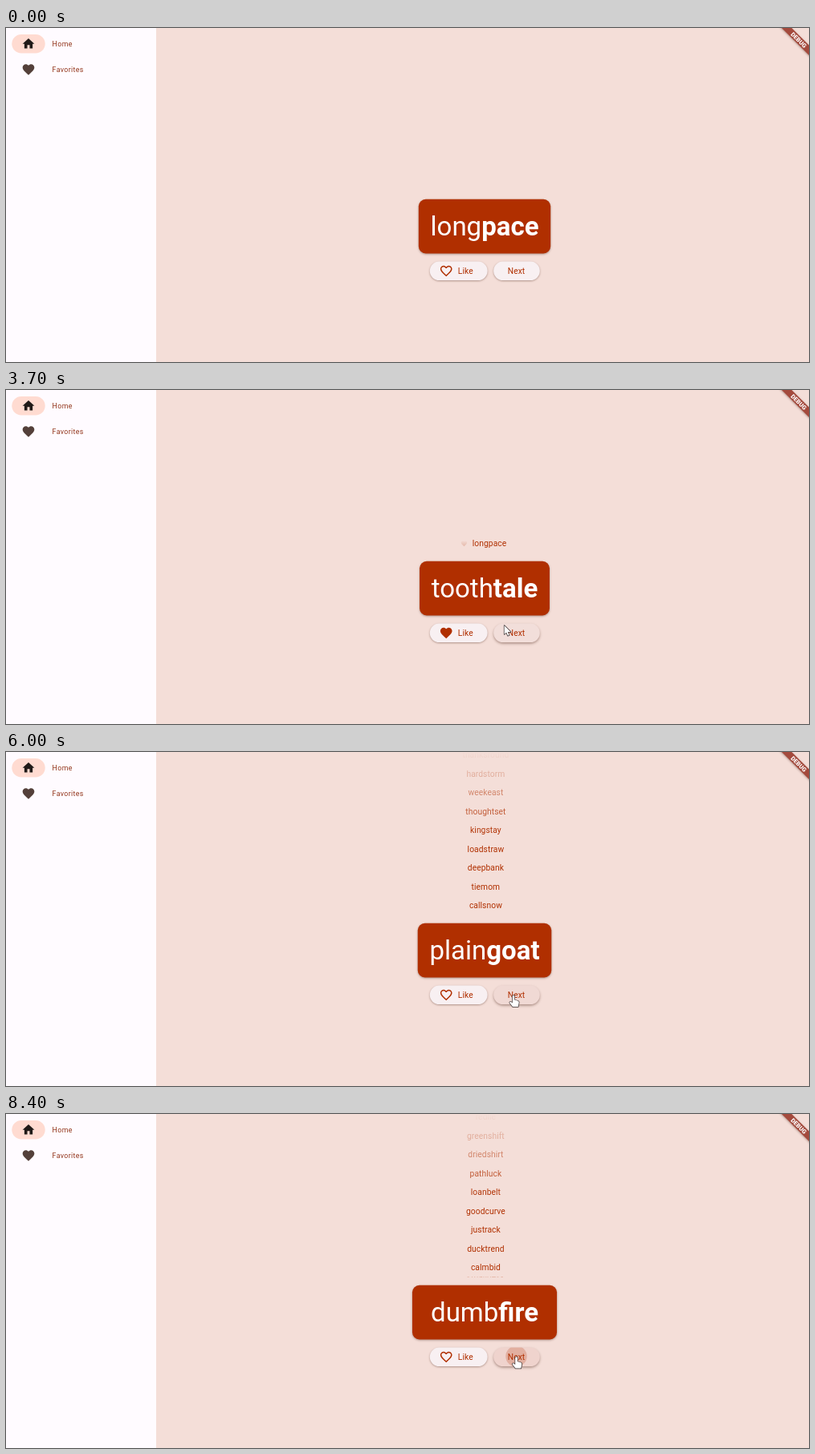
An HTML page with a canvas that plays this animation: 1000 px wide and 417 px high, repeating every 8.5 s.

```html
<!DOCTYPE html>
<html lang="en">
<head>
<meta charset="utf-8">
<title>Word pairs</title>
<style>
  html, body { margin: 0; width: 100%; height: 100%; overflow: hidden; background: #f4ded8; }
  canvas { display: block; }
</style>
</head>
<body>
<canvas id="stage" width="1000" height="417"></canvas>
<script>
const ctx = document.getElementById('stage').getContext('2d');
const LOOP = 8500, RED = '#b02f00', INK = '#201a18';
const ROW = 23.5, LIST_END = 203.5, INSERT_MS = 150, RESIZE_MS = 100;
const CARD_X = 596, SMALL = '10.28px Roboto, sans-serif';

const pairs = ('long-pace tooth-tale truth-grass near-team grand-beard thanks-round hard-storm ' +
  'week-east thought-set king-stay load-straw deep-bank tie-mom calls-now plain-goat ' +
  'loan-slope front-aid gray-charm mad-air gas-tour storm-fluid red-lie green-shift ' +
  'dried-shirt path-luck loan-belt good-curve just-rack duck-trend calm-bid small-desk ' +
  'dumb-fire').split(' ').map(p => p.split('-'));

// When each pair appears: [start, count, interval]
const shownAt = [[-1000, 1, 0], [2050, 1, 0], [4100, 6, 157], [5104, 2, 95], [5320, 5, 130],
  [6200, 7, 173.8], [7355, 8, 112], [8250, 2, 149]]
  .flatMap(([start, n, gap]) => Array.from({ length: n }, (_, i) => start + i * gap));
const likes = [[0, 1250], [1, 2950]]; // pair index, time of the like

// Pointer: time, x, y
const pointerKeys = [[400, 690, 425], [1000, 560, 305], [1350, 560, 305], [1600, 634, 306],
  [2200, 634, 306], [2600, 562, 305], [3250, 562, 305], [3700, 620.5, 294], [3900, 632, 304],
  [6200, 632, 304], [7200, 635.5, 303.5], [8500, 635.5, 303.5]];

const heart = new Path2D('M12 21.35l-1.45-1.32C5.4 15.36 2 12.28 2 8.5 2 5.42 4.42 3 7.5 3c1.74 0 3.41.81 4.5 2.09C13.09 3.81 14.76 3 16.5 3 19.58 3 22 5.42 22 8.5c0 3.78-3.4 6.86-8.55 11.54z');
const heartLine = new Path2D(heart);
heartLine.addPath(new Path2D('M12 18.65C7.14 14.24 4 11.39 4 8.5 4 6.5 5.5 5 7.5 5c1.54 0 3.04 1 3.57 2.36h1.87C13.46 6 14.96 5 16.5 5c2 0 3.5 1.5 3.5 3.5 0 2.89-3.14 5.74-8 10.15z'));
const house = new Path2D('M10 20v-6h4v6h5v-8h3L12 3 2 12h3v8z');
const arrow = new Path2D('M0 0V11L2.6 8.6 4.4 12.8 6.2 12 4.4 8H8Z');
const hand = new Path2D('M-1.3 1C-1.3-.6 1.3-.6 1.3 1V5.6L5 6.6C6.5 7 7 8 6.7 9.3L5.8 14H-1L-4.6 9.4C-5.2 8.3-4 7.4-3 8.1L-1.3 9.4Z');

const clamp = v => Math.max(0, Math.min(1, v));
const lerp = (a, b, k) => a + (b - a) * k;

const fade = ctx.createLinearGradient(0, 0, 0, LIST_END / 2);
fade.addColorStop(0, 'rgba(176,47,0,0)');
fade.addColorStop(1, RED);

function at(x, y, draw) {
  ctx.save();
  ctx.translate(x, y);
  draw();
  ctx.restore();
}

function icon(path, x, y, size, color) {
  at(x, y, () => {
    ctx.scale(size / 24, size / 24);
    ctx.translate(-12, -12);
    ctx.fillStyle = color;
    ctx.fill(path, 'evenodd');
  });
}

function text(str, x, y, font, color, spacing = 0) {
  ctx.font = font;
  ctx.letterSpacing = spacing + 'px';
  ctx.fillStyle = color;
  ctx.fillText(str, x, y);
}

function width(str, font, spacing = 0) {
  ctx.font = font;
  ctx.letterSpacing = spacing + 'px';
  return ctx.measureText(str).width;
}

function box(x, y, w, h, r, color, shadow) {
  ctx.save();
  if (shadow) {
    ctx.shadowColor = 'rgba(70,30,15,.4)';
    ctx.shadowBlur = 1.5 + shadow;
    ctx.shadowOffsetY = shadow;
  }
  ctx.fillStyle = color;
  ctx.beginPath();
  ctx.roundRect(x, y, w, h, r);
  ctx.fill();
  ctx.restore();
}

const headFont = weight => weight + ' 33px Roboto, sans-serif';
const pairWidth = ([a, b]) => width(a, headFont(400)) + width(b, headFont(700));

function cardWidth(t, current) {
  let w = pairWidth(pairs[0]);
  for (let i = 1; i <= current; i++) {
    const end = i < current ? shownAt[i + 1] : t;
    w = lerp(w, pairWidth(pairs[i]), clamp((end - shownAt[i]) / RESIZE_MS));
  }
  return w + 29.4;
}

function pointerAt(t) {
  const i = pointerKeys.findIndex(k => k[0] > t);
  if (i < 1) return null;
  const [t0, x0, y0] = pointerKeys[i - 1], [t1, x1, y1] = pointerKeys[i];
  const k = (t - t0) / (t1 - t0);
  return { x: lerp(x0, x1, k), y: lerp(y0, y1, k) };
}

const isLiked = (i, t) => likes.some(([n, time]) => n === i && t >= time);

function sidebar() {
  box(0, 0, 187, 417, 0, '#fffbff');
  box(7.3, 8, 41.4, 23.5, 11.75, '#ffdbd1');
  icon(house, 28, 19.7, 17.6, INK);
  icon(heart, 28, 51.9, 17.6, '#54403a');
  const font = '8.8px Roboto, sans-serif';
  text('Home', 57.6, 22.9, font, '#93361c', .37);
  text('Favorites', 57.6, 55.1, font, '#93361c', .37);
}

function history(t, current) {
  let bottom = LIST_END;
  for (let i = current - 1; i >= 0 && bottom > 0; i--) {
    const h = ROW * clamp((t - shownAt[i + 1]) / INSERT_MS);
    const y = bottom - h / 2, word = pairs[i].join('');
    const liked = isLiked(i, t);
    const x = (liked ? 602 : 597.4) - width(word, SMALL, .07) / 2;
    ctx.save();
    ctx.beginPath();
    ctx.rect(187, bottom - h, 813, h);
    ctx.clip();
    if (liked) icon(heart, x - 10.3, y, 8.8, fade);
    text(word, x, y + 3.6, SMALL, fade, .07);
    ctx.restore();
    bottom -= h;
  }
}

function card(t, current) {
  const w = cardWidth(t, current), [a, b] = pairs[current];
  box(CARD_X - w / 2, 213.8, w, 67.6, 8.8, RED, 1);
  ctx.save();
  ctx.beginPath();
  ctx.rect(CARD_X - w / 2, 213, w, 69);
  ctx.clip();
  const x = CARD_X - pairWidth(pairs[current]) / 2;
  text(a, x, 259, headFont(400), '#fff');
  text(b, x + width(a, headFont(400)), 259, headFont(700), '#fff');
  ctx.restore();
}

function button(x, w, t, pointer, clicks) {
  const y = 291.6, h = 23.5;
  const hover = pointer && pointer.x > x && pointer.x < x + w && pointer.y > y && pointer.y < y + h;
  box(x, y, w, h, h / 2, hover ? '#f2deda' : '#f8f0f2', hover ? 1.6 : .8);
  ctx.save();
  ctx.beginPath();
  ctx.roundRect(x, y, w, h, h / 2);
  ctx.clip();
  for (const click of clicks) {
    const age = t - click + 10;
    if (age < 0 || age > 180) continue;
    const p = pointerAt(click);
    ctx.fillStyle = `rgba(176,47,0,${.22 * clamp((180 - age) / 70)})`;
    ctx.beginPath();
    ctx.arc(p.x, p.y - 1, 8 + 52 * clamp(age / 120), 0, 7);
    ctx.fill();
  }
  ctx.restore();
}

function banner() {
  at(987.2, 15, () => {
    ctx.rotate(Math.PI / 4);
    box(-31, -4.4, 62, 8.8, 0, '#a44a3d', 1);
    ctx.textAlign = 'center';
    text('DEBUG', 0, 2.7, '900 7.5px Roboto, sans-serif', '#fff');
  });
}

function drawPointer({ x, y }) {
  const onButton = y > 296 && y < 315 && (x > 528 && x < 599 || x > 608 && x < 665);
  const shape = onButton ? hand : arrow;
  at(x, y, () => {
    ctx.lineJoin = 'round';
    ctx.lineWidth = 1.4;
    ctx.strokeStyle = '#3a3030';
    ctx.stroke(shape);
    ctx.fillStyle = '#fff';
    ctx.fill(shape);
  });
}

function draw(t) {
  const current = shownAt.filter(s => s <= t).length - 1;
  const pointer = pointerAt(t);
  box(0, 0, 1000, 417, 0, '#f4ded8');
  sidebar();
  history(t, current);
  card(t, current);
  button(527.8, 71.8, t, pointer, likes.map(l => l[1]));
  button(607.2, 57.6, t, pointer, shownAt.slice(1));
  icon(isLiked(current, t) ? heart : heartLine, 548.2, 303.3, 17.6, RED);
  text('Like', 562.8, 306.9, SMALL, RED, .07);
  text('Next', 624.8, 306.9, SMALL, RED, .07);
  banner();
  if (pointer) drawPointer(pointer);
}

const start = performance.now();
function frame() {
  draw((performance.now() - start) % LOOP);
  requestAnimationFrame(frame);
}
frame();
</script>
</body>
</html>
```
